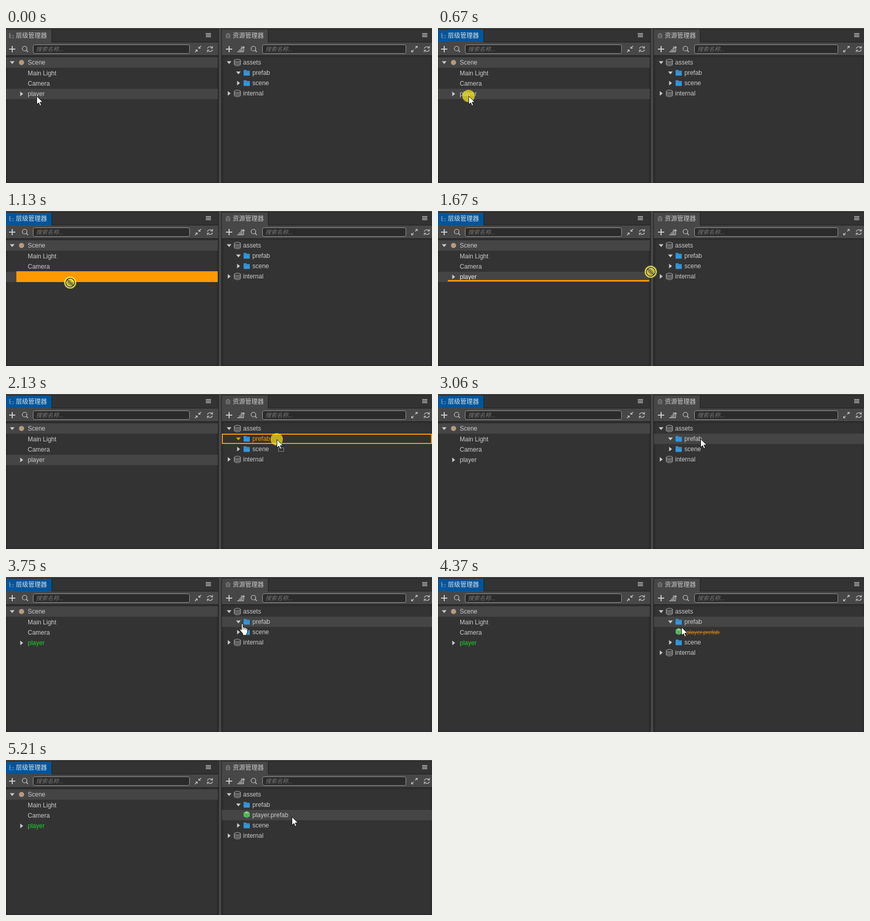
These frames come from a looping animation (823x301 px, 5.38 s). An HTML page with a canvas:

```html
<!DOCTYPE html>
<html lang="zh">
<head>
<meta charset="utf-8">
<style>
html, body { margin: 0; width: 100%; height: 100%; overflow: hidden; background: #474747; }
canvas { display: block; width: 823px; height: 301px; }
</style>
</head>
<body>
<canvas id="stage" width="823" height="301"></canvas>
<script>
const c = document.getElementById('stage').getContext('2d');
const LOOP = 5380, STEP = 76.9;
const FONT = '"Liberation Sans", "Noto Sans CJK SC", "Noto Sans CJK", sans-serif';
const ORANGE = '#ff9900', GREEN = '#1bd42b', INK = '#cccccc', HOVER = '#454545', BLUE = '#3396dc';

// Pointer path: time, x, y
const PATH = [
  [670, 59, 132], [980, 68, 133], [1130, 124, 139], [1290, 230, 156], [1440, 345, 164],
  [1670, 411, 118], [1820, 470, 92], [1980, 514, 74], [2130, 523, 88], [2280, 522, 111],
  [2510, 507, 87], [3220, 507, 87], [3600, 457, 90], [3740, 453, 91], [4060, 455, 92],
  [4360, 470, 97], [4600, 519, 107], [4750, 519, 107], [4980, 548, 110], [5130, 548, 110], [5205, 552, 110]
];

function pointer(t) {
  const q = Math.floor((t + 31) / STEP) * STEP - 23;
  let i = PATH.findIndex(p => p[0] > q);
  if (i === 0) return PATH[0].slice(1);
  if (i < 0) return PATH[PATH.length - 1].slice(1);
  const a = PATH[i - 1], b = PATH[i], k = (q - a[0]) / (b[0] - a[0]);
  return [1, 2].map(n => Math.round(a[n] + (b[n] - a[n]) * k));
}

function rect(x, y, w, h, color) {
  c.fillStyle = color;
  c.fillRect(x, y, w, h);
}

function text(s, x, y, color = INK, size = 12, style = '') {
  c.font = `${style} ${size}px ${FONT}`;
  c.fillStyle = color;
  c.fillText(s, x, y);
}

// Open or closed shape from an SVG path, placed at x, y
function line(d, x, y, color = INK, width = 1.2) {
  c.save();
  c.translate(x, y);
  c.strokeStyle = color;
  c.lineWidth = width;
  c.stroke(new Path2D(d));
  c.restore();
}

function shape(d, x, y, color) {
  c.save();
  c.translate(x, y);
  c.fillStyle = color;
  c.fill(new Path2D(d));
  c.restore();
}

function disc(x, y, r, color) {
  c.beginPath();
  c.arc(x, y, r, 0, 7);
  c.fillStyle = color;
  c.fill();
}

function toggle(x, y, open, color = INK) {
  shape(open ? 'M-4.5-2.5h9L0 3z' : 'M-2.5-4.5v9L3 0z', x, y, color);
}

function folder(x, y) {
  shape('M-6-4.5q0-1 1-1h4l1.5 1.5H6v8.5q0 1-1 1H-5q-1 0-1-1z', x, y, BLUE);
  line('M-5-2H6', x, y, '#2379b8', 0.8);
}

function database(x, y) {
  line('M-6-4C-6-7 6-7 6-4S-6-1-6-4V4C-6 7 6 7 6 4V-4M-6-1.2C-6 1.6 6 1.6 6-1.2M-6 1.6C-6 4.4 6 4.4 6 1.6', x, y, '#b4b4b4', 1);
}

function cube(x, y) {
  shape('M0-6.5L6-3.5V3.5L0 6.5L-6 3.5V-3.5z', x, y, '#5cb85c');
  shape('M0-6.5L6-3.5L0-.5L-6-3.5z', x, y, '#83d383');
  line('M-6-3.5L0-.5L6-3.5M0-.5V6.5', x, y, '#3e8f43', 0.8);
}

function panel(x, w, tabW, title, active) {
  rect(x - 1, 2, w + 2, 299, '#1f1f1f');
  rect(x, 3, w, 24, '#333333');
  rect(x, 3, tabW, 25, '#474747');
  if (active) rect(x, 4, tabW, 23, '#00559c');
  rect(x + tabW, 3, 1, 24, '#1f1f1f');
  rect(x, 28, w, 25, '#474747');
  rect(x, 54, w, 247, '#333333');
  for (let i = 0; i < 4; i++) {
    const shade = `rgba(0,0,0,${0.11 - i * 0.025})`;
    rect(x + i, 54, 1, 247, shade);
    rect(x + w - 1 - i, 54, 1, 247, shade);
    rect(x, 54 + i, w, 1, shade);
    rect(x, 300 - i, w, 1, shade);
  }
  text(title, x + (x ? 21 : 19), 19, active ? '#e2e2e2' : INK);
  for (const y of [10, 13, 16]) rect(x + w - (x ? 19 : 24), y, 10, 1.5, '#c4c4c4');
}

function search(x, w, iconX) {
  c.beginPath();
  c.arc(iconX, 40, 4.5, 0, 7);
  c.strokeStyle = INK;
  c.lineWidth = 1.2;
  c.stroke();
  line('M3 3l3.5 3.5', iconX, 40, INK, 1.5);
  c.beginPath();
  c.roundRect(x + 0.5, 32.5, w, 17, 3);
  c.fillStyle = '#2b2b2b';
  c.fill();
  c.strokeStyle = '#9a9a9a';
  c.lineWidth = 1;
  c.stroke();
  text('搜索名称...', x + 6, 45, '#777777', 11, 'italic');
}

function plus(x) {
  rect(x - 6, 40, 12, 2, INK);
  rect(x - 1, 35, 2, 12, INK);
}

function refresh(x) {
  line('M-5-1C-4-5 2-6 4.5-2.5M5-6v4H1M5 1C4 5-2 6-4.5 2.5M-5 6V2H-1', x, 41, INK, 1.1);
}

function outline(y, h = 20) {
  c.strokeStyle = ORANGE;
  c.lineWidth = 2;
  c.strokeRect(418, y + 1, 404, h - 2);
}

function hierarchy(t) {
  panel(0, 410, 88, '层级管理器', t >= 670);
  line('M-4-4h3M-3-4V4M-3 0h3M-3 4h3M2 0h3M2 4h3', 10, 15, '#a5a5a5', 1);
  plus(12);
  search(52, 302, 36);
  line('M6-6L1.5-1.5M1.5-5v3.5H5M-6 6L-1.5 1.5M-5 1.5h3.5V5', 371, 41);
  refresh(394);
  rect(0, 57, 409, 20, HOVER);
  toggle(12, 67, true);
  disc(30, 67, 5, '#b59b80');
  text('Scene', 42, 71);
  text('Main Light', 42, 92);
  text('Camera', 42, 112);
  if (t < 3060) rect(0, 118, 409, 20, HOVER);
  const dragging = t >= 980 && t < 1750;
  toggle(30, 128, false);
  text('player', 42, 132, t >= 3370 ? GREEN : dragging ? '#eeeeee' : INK);
  if (dragging && t < 1210) rect(20, 117, 389, 21, ORANGE);
  else if (dragging) rect(19, 134, 389, 3, ORANGE);
}

function assets(t, y) {
  panel(417, 406, 89, '资源管理器', false);
  line('M-3.5-3h7V4h-7zM-1.5-3v-1.5h3V-3M-3.5-.5h7M-3.5 2h7', 429, 15, '#858585', 1);
  plus(431);
  line('M-6 5H6M-3 2H4M0-1H4M1-4H4', 453, 41, INK, 1.4);
  line('M8 5V-4M6-2l2-3l2 3', 451, 41, INK, 1.2);
  search(495, 277, 478);
  line('M1.5-1.5L5.5-5.5M2-5.5h3.5V-2M-1.5 1.5L-5.5 5.5M-5.5 2v3.5H-2', 789, 41);
  refresh(813);

  const over = t >= 1750 && t < 3060;
  const onAssets = over && y < 77, onPrefab = over && y >= 77 && y < 97, onScene = over && y >= 97;
  const added = t >= 3910, importing = t >= 4290 && t < 4440;
  if (t >= 3060 && t < 4440) rect(417, 77, 406, 20, HOVER);
  if (t >= 4440) rect(417, 97, 406, 20, HOVER);

  const tint = on => on ? ORANGE : INK;
  toggle(431, 67, true, tint(onAssets));
  database(447, 67);
  text('assets', 458, 71, tint(onAssets));
  toggle(449, 87, true, tint(onPrefab));
  folder(465, 87);
  text('prefab', 476, 91, tint(onPrefab));
  if (added) {
    cube(465, 106);
    if (importing) {
      text('player.prefab', 480, 111, '#d5860f', 11);
      rect(477, 107, 67, 1, '#d5860f');
    } else text('player.prefab', 476, 111);
  }
  const dy = added ? 20 : 0;
  toggle(449, 107 + dy, false, tint(onScene));
  folder(465, 107 + dy);
  text('scene', 476, 111 + dy, tint(onScene));
  toggle(431, 127 + dy, false);
  database(447, 127 + dy);
  text('internal', 458, 131 + dy);
  if (onAssets) outline(57);
  if (onPrefab) outline(77);
  if (onScene) outline(97);
}

function arrow(x, y) {
  const d = 'M.5.5V16.5L4.2 13L6.8 19L9.3 18L6.8 12H12z';
  shape(d, x, y, '#ffffff');
  line(d, x, y, '#1a1a1a', 1);
}

function hand(x, y) {
  const d = 'M2 1.5Q2 0 3.5 0T5 1.5V7Q5.5 6 7 6.5T8 7.5Q9 6.8 10.2 7.4T11 8.5Q13.5 7.8 13.5 10V15Q13.5 17 12 19V22H4.5V19L-.5 13Q-2 10.5-.5 10T2 12z';
  shape(d, x, y, '#ffffff');
  line(d, x, y, '#1a1a1a', 1);
  line('M5 7v4M8 8v3M11 9v3', x, y, '#1a1a1a', 0.9);
}

function noDrop(x, y) {
  for (const [color, width] of [['rgba(255,255,190,.75)', 4], ['#25250c', 1.5]]) {
    c.beginPath();
    c.arc(x, y, 8.5, 0, 7);
    c.strokeStyle = color;
    c.lineWidth = width;
    c.stroke();
    line('M-6-6L6 6', x, y, color, width);
  }
  line('M-3.5-6.5L6.5 3.5M-6.5-3.5L3.5 6.5', x, y, '#25250c', 1);
}

function cursor(t, x, y) {
  if (t >= 670 && t < 3060) disc(x, y, 12, 'rgba(255,238,20,.68)');
  if (t >= 980 && t < 1750) return noDrop(x, y);
  if (t >= 3600 && t < 4210) return hand(x, y);
  if (t >= 1750 && t < 3060) {
    c.strokeStyle = '#111111';
    c.lineWidth = 1;
    c.strokeRect(x + 3.5, y + 16.5, 10, 7);
    c.setLineDash([1, 1]);
    c.strokeStyle = '#ffffff';
    c.strokeRect(x + 3.5, y + 16.5, 10, 7);
    c.setLineDash([]);
  }
  arrow(x, y);
}

function draw(now) {
  const t = now % LOOP;
  const [x, y] = pointer(t);
  rect(0, 0, 823, 301, '#474747');
  hierarchy(t);
  assets(t, y);
  cursor(t, x, y);
}

const start = performance.now();
function tick() {
  draw(performance.now() - start);
  requestAnimationFrame(tick);
}
tick();
</script>
</body>
</html>
```
